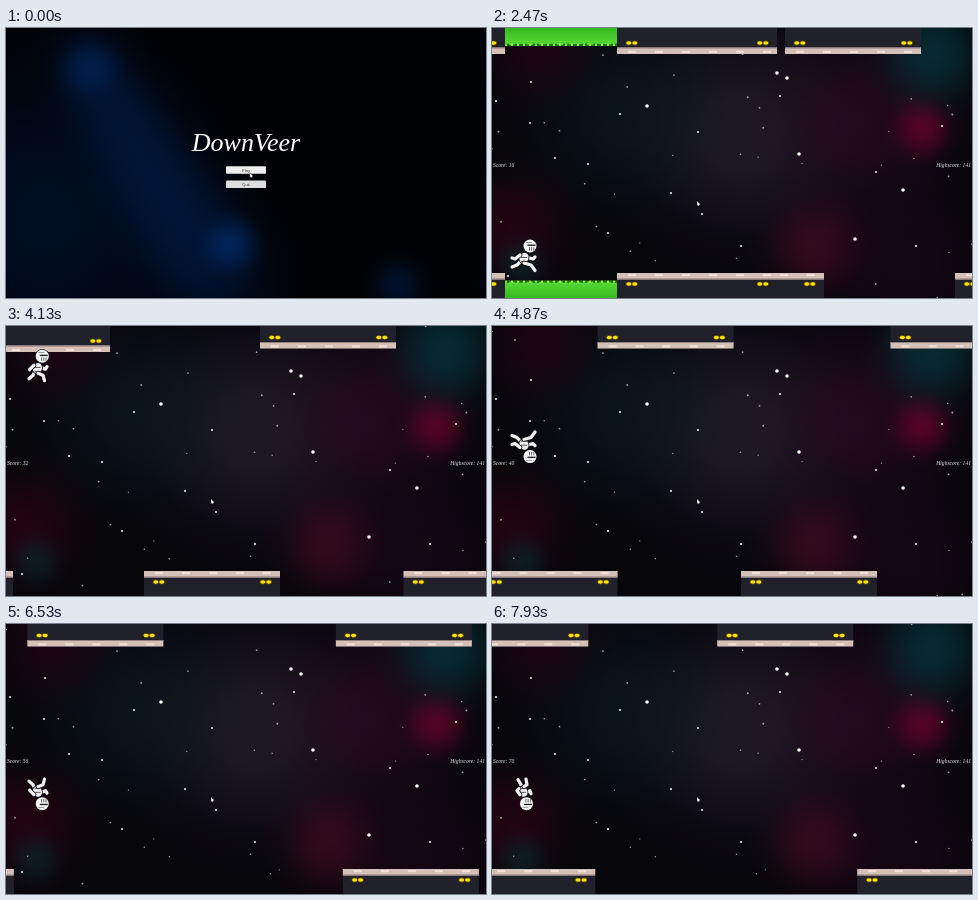
An HTML page with a canvas that plays this animation: 480 by 270 pixels, repeating every 8 s.

```html
<!DOCTYPE html>
<html lang="en">
<head>
<meta charset="utf-8">
<style>
  html, body { margin: 0; height: 100%; overflow: hidden; background: #000; }
  canvas { display: block; width: 100vw; height: 100vh; }
</style>
</head>
<body>
<canvas id="stage" width="480" height="270"></canvas>
<script>
const ctx = document.getElementById('stage').getContext('2d');
const LOOP = 8000, FPS = 15, GAME_START = 0.8;
const FLOOR = 228, CEILING = 39, FALL_TIME = 0.42;
const SPEED = 195, SLAB = 136, GRASS_X = -169, GRASS_WIDTH = 112;
const STRIDE = 4 / FPS;

// Seconds at which gravity reverses, and world x of the regular slabs
const flips = [2.6, 4.1, 4.55, 5.78, 6.3, 7.13, 7.7];
const ceilingSlabs = [111, 397, 690, 998.5, 1263.5];
const floorSlabs = [14, 281, 540.5, 1005.5, 1403.5];

let seed = 11;
function random() {
  seed = (seed * 16807) % 2147483647;
  return seed / 2147483647;
}
const faintStars = Array.from({ length: 42 }, () => [random() * 480, random() * 270, 0.6 + random() * 0.4]);
const clearStars = [
  [4,73], [39,54], [38,95], [128,86], [206,104], [96,136], [63,130], [116,205],
  [179,165], [210,186], [249,218], [288,68], [450,98], [384,144], [424,218], [16,248]
];
const bigStars = [[155,78], [307,126], [363,211], [285,45], [295,50], [411,162]];

function rect(x, y, w, h, color) {
  ctx.fillStyle = color;
  ctx.fillRect(x, y, w, h);
}

function oval(x, y, rx, ry, color, turn = 0) {
  ctx.fillStyle = color;
  ctx.beginPath();
  ctx.ellipse(x, y, rx, ry, turn, 0, Math.PI * 2);
  ctx.fill();
}

function text(value, x, y, font, color, align = 'left') {
  ctx.font = font;
  ctx.fillStyle = color;
  ctx.textAlign = align;
  ctx.fillText(value, x, y);
}

function glow(x, y, r, rgb, alpha) {
  const fill = ctx.createRadialGradient(x, y, 0, x, y, r);
  for (let p = 0; p <= 1; p += 0.25)
    fill.addColorStop(p, `rgba(${rgb},${alpha * (1 + Math.cos(p * Math.PI)) / 2})`);
  rect(x - r, y - r, 2 * r, 2 * r, fill);
}

function pointer(x, y) {
  ctx.beginPath();
  ctx.moveTo(x, y);
  ctx.lineTo(x, y + 4.2);
  ctx.lineTo(x + 1.8, y + 5);
  ctx.lineTo(x + 3.1, y + 3);
  ctx.closePath();
  ctx.fillStyle = '#fff';
  ctx.fill();
  ctx.strokeStyle = '#222';
  ctx.lineWidth = 0.4;
  ctx.stroke();
}

function button(label, y, color) {
  ctx.fillStyle = color;
  ctx.beginPath();
  ctx.roundRect(220, y, 40, 7.5, 1.2);
  ctx.fill();
  text(label, 240, y + 5.2, '4px "Liberation Sans", sans-serif', '#333', 'center');
}

function menu(frame) {
  rect(0, 0, 480, 270, '#010206');
  glow(40, 190, 210, '0,18,46', 0.7);
  // A diagonal band of blue haze
  for (let p = 0; p <= 1; p += 0.2) glow(84 + 125 * p, 40 + 205 * p, 65 + 25 * p, '0,34,88', 0.38);
  glow(84, 40, 40, '0,45,110', 0.45);
  glow(225, 216, 38, '0,55,135', 0.5);
  glow(392, 258, 38, '0,32,80', 0.5);

  text('DownVeer', 240, 123, 'italic 26px "Liberation Serif", serif', '#fff', 'center');
  button('Play', 138.3, frame === 5 ? '#c4c4c4' : '#eee');
  button('Quit', 152.6, '#dedede');
  pointer(243.8, 144.8);
}

function space() {
  rect(0, 0, 480, 270, '#07060b');
  glow(250, 105, 150, '42,34,52', 0.7);
  glow(370, 95, 130, '50,10,42', 0.6);
  glow(430, 100, 42, '110,2,42', 0.7);
  glow(440, 25, 75, '4,62,68', 0.65);
  glow(130, 85, 130, '10,34,38', 0.5);
  glow(325, 218, 70, '78,12,38', 0.65);
  glow(410, 235, 110, '34,6,28', 0.5);
  glow(20, 200, 80, '52,2,22', 0.6);
  glow(30, 235, 35, '6,50,52', 0.5);
  glow(50, 20, 80, '44,2,22', 0.5);

  for (const [x, y, r] of faintStars) oval(x, y, r, r, '#9aa5a5');
  for (const [x, y] of clearStars) oval(x, y, 1.1, 1.1, '#dde8e8');
  for (const [x, y] of bigStars) oval(x, y, 1.8, 1.8, '#fff');
}

function lamp(x, y) {
  for (const dx of [2.8, 8.8]) {
    oval(x + dx, y, 3.1, 2.4, '#5a4600');
    oval(x + dx, y, 2.5, 1.8, '#ffe30a');
  }
}

// Drawn away from the walking surface: dir 1 is a floor, -1 a ceiling
function platform(x, width, surface, dir) {
  if (x > 480 || x + width < 0) return;
  ctx.save();
  ctx.translate(x, surface);
  ctx.scale(1, dir);
  rect(0, 0, width, 30, '#20212b');
  rect(0, 0, width, 6.5, '#d5c0b7');
  rect(0, 5.5, width, 1, '#8f807c');
  for (let dx = 11; dx < width - 8; dx += 27) rect(dx, 1, 8, 2.2, '#eee0d8');
  lamp(9, 11);
  lamp(width - 20, 11);
  ctx.restore();
}

function grass(x, surface, dir) {
  ctx.save();
  ctx.translate(x, surface);
  ctx.scale(1, dir);
  const fill = ctx.createLinearGradient(0, 0, 0, 17);
  fill.addColorStop(0, '#58dc35');
  fill.addColorStop(1, '#36b91f');
  rect(0, 0, GRASS_WIDTH, 20, fill);
  for (let i = 0; i < GRASS_WIDTH; i += 2)
    rect(i, -0.5, 2, 1 + Math.abs(Math.sin(i * 2.3)) * 1.5, i % 6 ? '#227b12' : '#a3e839');
  ctx.restore();
}

function scenery(scroll) {
  for (const dir of [-1, 1]) {
    const ground = dir > 0 ? 245 : 26;
    grass(GRASS_X - scroll, dir > 0 ? 253 : 17.5, dir);
    platform(GRASS_X - 360 - scroll, 360, ground, dir);
    for (const x of dir > 0 ? floorSlabs : ceilingSlabs)
      platform(x - scroll, SLAB, dir < 0 && x > 300 ? 22.5 : ground, dir);
    platform(GRASS_X + GRASS_WIDTH - scroll, 160, ground, dir);
  }
}

// Constant speed with two boosts
function scrollAt(t) {
  return SPEED * (t - 3.4) + 31 * Math.max(0, t - 4.69) + 38 * Math.max(0, t - 6.52);
}

function playerAt(t) {
  const count = flips.filter(time => time <= t).length;
  const up = count % 2 ? -1 : 1;
  const fall = count ? Math.min(1, (t - flips[count - 1]) / FALL_TIME) ** 2 : 1;
  const [from, to] = up > 0 ? [CEILING, FLOOR] : [FLOOR, CEILING];
  return { y: from + (to - from) * fall, up };
}

function limb(...points) {
  for (const [color, width] of [['#15151a', 4.8], ['#f2f2f2', 3.2]]) {
    ctx.beginPath();
    points.forEach(p => ctx.lineTo(...p));
    ctx.strokeStyle = color;
    ctx.lineWidth = width;
    ctx.stroke();
  }
}

function knight(t) {
  const { y, up } = playerAt(t);
  const swing = Math.sin(Math.PI * (t - 5.8) / STRIDE);
  const reach = swing * swing;
  ctx.save();
  ctx.translate(33, y);
  ctx.scale(1, up);
  ctx.lineCap = ctx.lineJoin = 'round';
  limb([-4, 5], [-4 - reach * 4, 9], [-7 - reach * 6, 14 - reach * 3]);
  limb([1, 1], [5 + reach * 3, 3], [6 + reach * 4, reach]);
  oval(-2 + reach, 2, 5.2, 6.2, '#15151a', 0.4);
  oval(-2 + reach, 2, 4.4, 5.3, '#eee', 0.4);
  limb([-1, 7], [2 + reach * 4, 9], [1 + reach * 9, 14.5]);
  limb([-5, -1], [-8 - reach * 2, 3], [-6 - reach * 7, 5 - reach * 3]);
  for (const dy of [1, 5]) rect(-5 + reach, dy, 6, 0.8, '#333');

  ctx.translate(1.5 + reach * 3.5, -10);
  oval(0, 0, 7.3, 7.3, '#15151a');
  oval(0, 0, 6.5, 6.5, '#f6f6f6');
  rect(-2.5, -1.5, 8, 1.4, '#222');
  for (let x = -1; x < 5; x += 2.2) rect(x, 1.2, 0.8, 3.5, '#444');
  rect(-4, -4, 6, 0.7, '#777');
  ctx.restore();
}

function game(t) {
  space();
  scenery(scrollAt(t));
  knight(t);

  const font = 'italic 5.6px "Liberation Serif", serif';
  const score = Math.max(0, Math.floor((t - 0.85) * 10));
  text(`Score: ${score}`, 1, 138.8, font, '#e6e6e6');
  text('Highscore: 141', 479, 138.8, font, '#e6e6e6', 'right');

  const glide = Math.min(1, (t - GAME_START) / 0.5);
  const nudge = t > 2 ? 1 : 0;
  pointer(244 - 42 * glide + 3 * nudge, 145 + 26 * glide + 2 * nudge);
}

function draw(now) {
  const frame = Math.floor((now % LOOP) * FPS / 1000 + 0.1) % 120;
  const t = frame / FPS;
  if (t < GAME_START) menu(frame);
  else game(t);
  requestAnimationFrame(draw);
}
requestAnimationFrame(draw);
</script>
</body>
</html>
```
